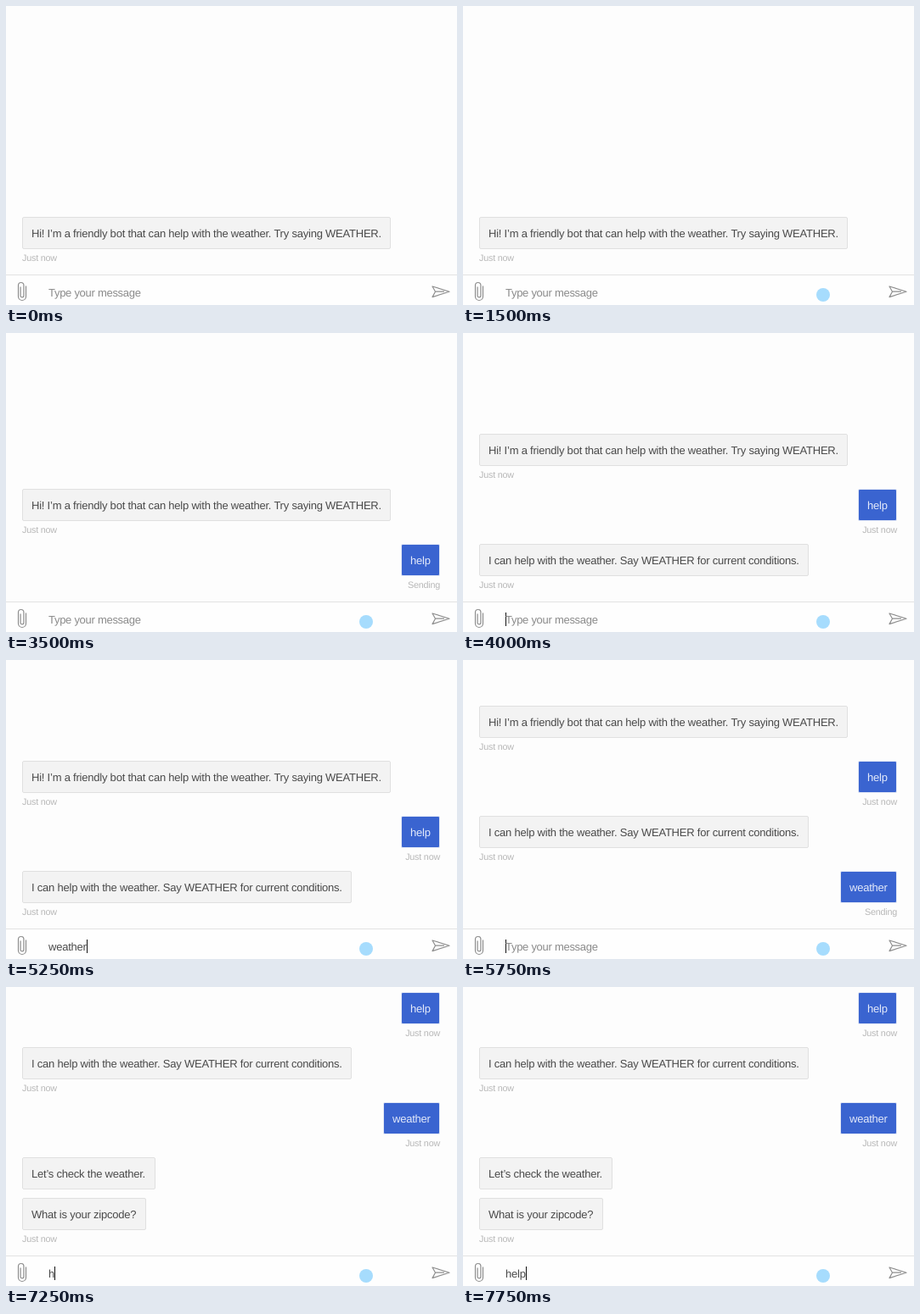
Recreate the animation shown at these times as an HTML page. Size 531 by 353 pixels, loop 8 s.

```html
<!DOCTYPE html>
<html lang="en">
<head>
<meta charset="utf-8">
<title>Weather bot chat</title>
<style>
  html, body { margin: 0; width: 100%; height: 100%; overflow: hidden; background: #fdfdfd; }
  #stage {
    position: relative; width: 531px; height: 353px; overflow: hidden;
    font: 13px "Liberation Sans", Arial, sans-serif; letter-spacing: -.22px; color: #4a4a4a;
    text-rendering: geometricPrecision;
  }
  #feed { position: absolute; left: 19px; width: 492px; bottom: 39px; }
  .msg { position: relative; height: 65px; }
  .msg.joined { height: 48px; }
  .bubble {
    box-sizing: border-box; height: 38px; padding: 0 10px; line-height: 37px; white-space: nowrap;
    background: #f3f3f3; border: 1px solid #e0e0e0; border-radius: 2px;
  }
  .user .bubble { margin-left: auto; color: #e4eafa; background: #3a64d0; border-color: #e3e8f6; }
  .status { font-size: 10.8px; line-height: 22px; color: #b8b8b8; }
  .user .status { text-align: right; }
  .joined .status { display: none; }
  #bar {
    position: absolute; left: 0; top: 317px; width: 531px; height: 36px;
    box-sizing: border-box; border-top: 1px solid #e2e2e2; background: #fefefe;
  }
  #field { position: absolute; left: 50px; top: 320px; line-height: 37px; white-space: nowrap; }
  #caret {
    display: inline-block; width: 1px; height: 16px; margin-right: -1px;
    vertical-align: -3px; background: #111;
  }
  #hint { color: #8a8a8a; letter-spacing: -.28px; }
  svg {
    position: absolute; left: 0; top: 0;
    fill: none; stroke: #8e8e8e; stroke-width: 1.2; stroke-linejoin: round;
  }
  #dot { fill: #a6dcfd; stroke: none; }
</style>
</head>
<body>
<div id="stage">
  <div id="feed"></div>
  <div id="bar"></div>
  <div id="field"><span id="typed"></span><span id="caret"></span><span id="hint">Type your message</span></div>
  <svg width="531" height="353">
    <path d="M23.5 330.5V343a4.5 4.5 0 0 1-9 0V329.7a3.2 3.2 0 0 1 6.4 0V342a1.9 1.9 0 0 1-3.8 0V331.5"/>
    <path d="M502 331L522 337.2L502 343.6L505.5 337.2ZM505.5 337.2H516"/>
    <circle id="dot"/>
  </svg>
</div>
<script>
const LOOP = 8000;
const $ = id => document.getElementById(id);

const messages = [
  { text: "Hi! I’m a friendly bot that can help with the weather. Try saying WEATHER.", width: 434 },
  { text: "help", width: 46, user: true },
  { text: "I can help with the weather. Say WEATHER for current conditions.", width: 388 },
  { text: "weather", width: 67, user: true },
  { text: "Let’s check the weather.", width: 157 },
  { text: "What is your zipcode?", width: 146 }
];

// [start ms, value]
const shown = [[0, 1], [3000, 2], [4000, 3], [5750, 4], [6000, 5], [7000, 6]];
const typing = [
  [0, ""], [2000, "h"], [2250, "he"], [2500, "hel"], [2750, "help"], [3000, ""],
  [4500, "w"], [4750, "wea"], [5000, "weath"], [5250, "weather"], [5750, ""],
  [7250, "h"], [7500, "hel"], [7750, "help"]
];
const blink = [[0, false], [1750, true], [3500, false], [4000, true], [6250, false], [6750, true]];
const pointer = [
  [0, [540, 200, 0]], [500, [523, 214, 8]], [750, [472, 282, 8]],
  [1000, [424, 341, 8]], [1250, [424, 341, 12]], [1500, [424, 341, 8]]
];

const at = (steps, t) => steps.filter(([start]) => start <= t).pop()[1];

function add(parent, className) {
  const el = document.createElement("div");
  el.className = className;
  return parent.appendChild(el);
}

const rows = messages.map(({ text, width, user }) => {
  const row = add($("feed"), "msg");
  row.classList.toggle("user", !!user);
  const bubble = add(row, "bubble");
  bubble.textContent = text;
  bubble.style.width = width + "px";
  return { row, status: add(row, "status") };
});

function drawFeed(count) {
  rows.forEach(({ row, status }, i) => {
    const { user } = messages[i];
    const last = i === count - 1;
    row.hidden = i >= count;
    row.classList.toggle("joined", i < count - 1 && !user && !messages[i + 1].user);
    status.textContent = user && last ? "Sending" : "Just now";
  });
}

function draw(t) {
  drawFeed(at(shown, t));
  const text = at(typing, t);
  $("typed").textContent = text;
  $("hint").hidden = text !== "";
  $("caret").style.visibility = at(blink, t) ? "visible" : "hidden";
  const [x, y, r] = at(pointer, t);
  const dot = $("dot");
  dot.setAttribute("cx", x);
  dot.setAttribute("cy", y);
  dot.setAttribute("r", r);
}

const origin = performance.now();
function tick() {
  draw((performance.now() - origin) % LOOP);
  requestAnimationFrame(tick);
}
tick();
</script>
</body>
</html>
```
